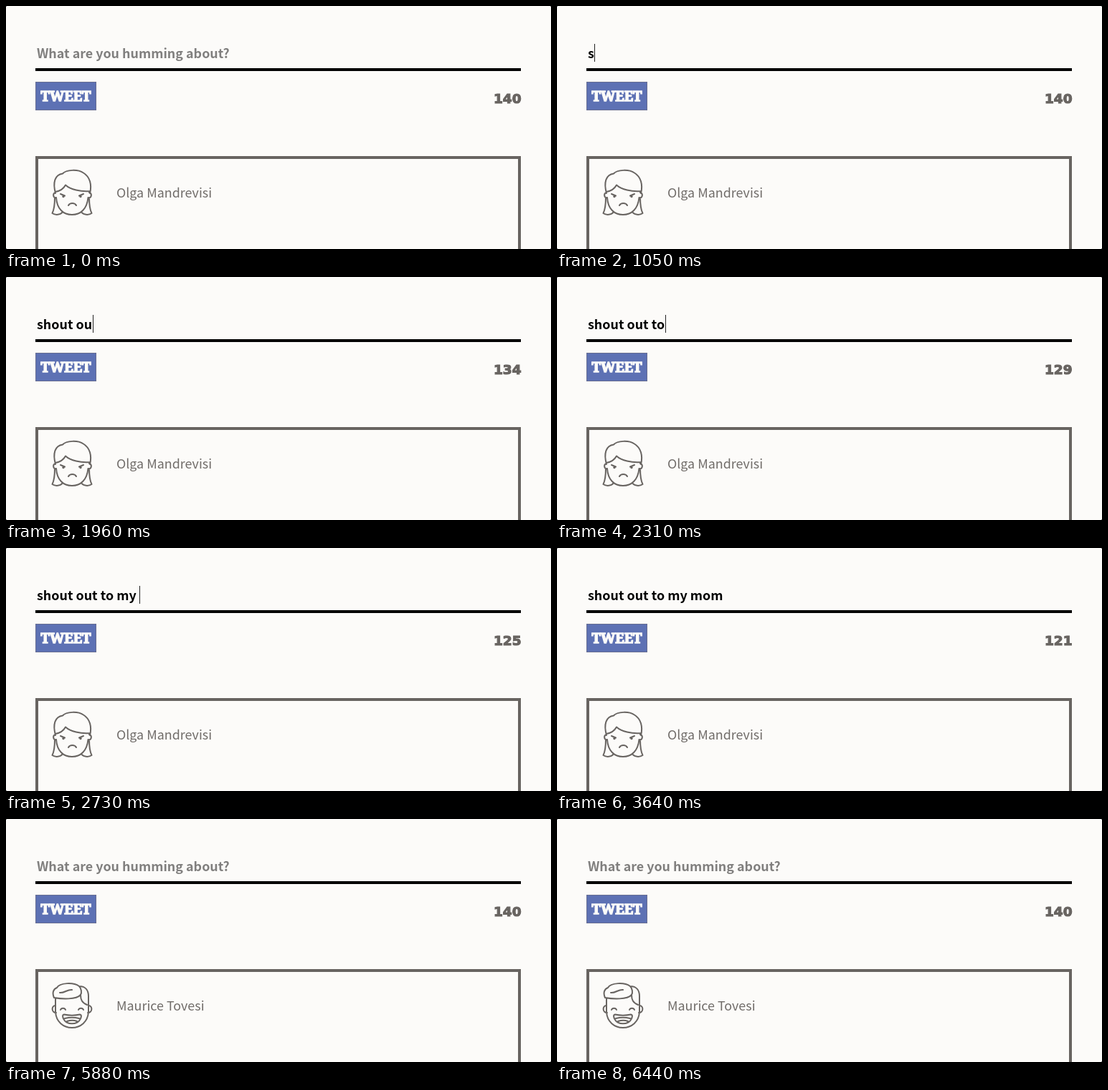
These frames come from a looping animation (760x340 px, 8000 ms). An HTML page with a canvas:

```html
<!DOCTYPE html>
<html lang="en">
<head>
<meta charset="utf-8">
<title>Compose box</title>
<style>
  html, body { margin: 0; width: 100%; height: 100%; overflow: hidden; background: #fcfbf9; }
  canvas { display: block; }
</style>
</head>
<body>
<canvas id="stage" width="760" height="340"></canvas>
<script>
const ctx = document.getElementById('stage').getContext('2d');

const LOOP = 8000;
const PAPER = '#fcfbf9', GREY = '#686461', BLUE = '#5d71b4';
const SANS = '"Noto Sans CJK JP", "Noto Sans CJK SC", "Noto Sans CJK", "Noto Sans", sans-serif';
const BODY = 'bold 17.9px ' + SANS;
const NAME = '300 17.9px ' + SANS;

const MESSAGE = 'shout out to my mom';
const KEY_TIMES = [
  1050, 1190, 1330, 1400, 1540, 1750,
  1890, 1960, 2030, 2100, 2170, 2240, 2380,
  2520, 2590, 2730, 2870, 2940, 3080
];
const FOCUS = 840, BLUR = 3640, SENT = 4830, REPLY = 5740;
const COUNT_LAG = 140;

const sadGirl = {
  lines: [
    // hair outline and curled ends
    'M69 262 C65 247 68 236 79 234.5 C84 229 100 228 108 233.5 C117 239 120 250 117 262',
    'M68 268 C68 277 67 285 64.5 290 C69 293 76 292.5 79 288',
    'M116 268 C116 277 117 285 119.5 290 C115 293 108 292.5 105 288',
    // fringe
    'M69 260 C75 259 80 256 83 250.5 C90 257 104 260 117 259',
    // face and ears
    'M70 268 C71 284 80 292 92 292 C104 292 113 284 114.5 268',
    'M69 261 C65 262 65 268 70 269 M116 261 C120 262 120 268 115 269',
    // mouth and brows
    'M87 279 C89 275 96 275 98 279',
    'M76 263 L82 265.5 M108 263 L102 265.5'
  ],
  dots: [[80, 266.5], [104, 266.5]]
};

const happyBoy = {
  lines: [
    // quiff
    'M67 250 C64 243 66 238 71 236 C75 229 94 228 102 234 C111 234 115 240 115 248 L115 262',
    'M67 250 C78 252 98 253 104 246 C106 243 105 237 102 234',
    'M75 243 C81 244 86 238 92 239',
    'M104 246 C104 253 106 257 113 260',
    // sides, ears and jaw
    'M69 251 L69 270 C70 284 80 292 92 292 C104 292 114 284 115 270 L115 262',
    'M69 261 C63 261 63 271 70 271 M115 261 C121 261 121 271 114 271',
    // closed eyes
    'M76 267 C77 264 82 264 83 267 M101 267 C102 264 107 264 108 267',
    // grin
    'M81 273.5 C88 275 96 275 103 273.5 C106 274 105 278 103 281 C99 288 85 288 81 281 C79 278 78 274 81 273.5 Z',
    'M82 279 C88 277.5 96 277.5 102 279 M85 283 C90 281.5 95 281.5 99 283'
  ],
  dots: []
};

for (const face of [sadGirl, happyBoy]) face.path = new Path2D(face.lines.join(' '));

function rect(x, y, w, h, color) {
  ctx.fillStyle = color;
  ctx.fillRect(x, y, w, h);
}

function label(text, x, y, font, color, { align = 'left', stroke = 0 } = {}) {
  ctx.font = font;
  ctx.textAlign = align;
  ctx.fillStyle = ctx.strokeStyle = color;
  ctx.fillText(text, x, y);
  if (stroke) {
    ctx.lineWidth = stroke;
    ctx.lineJoin = 'miter';
    ctx.miterLimit = 2;
    ctx.strokeText(text, x, y);
  }
}

function drawFace({ path, dots }) {
  ctx.strokeStyle = ctx.fillStyle = GREY;
  ctx.lineWidth = 2;
  ctx.lineCap = ctx.lineJoin = 'round';
  ctx.stroke(path);
  for (const [x, y] of dots) {
    ctx.beginPath();
    ctx.arc(x, y, 1.7, 0, Math.PI * 2);
    ctx.fill();
  }
}

// Number of characters in the field at time t
function typed(t) {
  return t >= SENT ? 0 : KEY_TIMES.filter(k => k <= t).length;
}

function drawField(t) {
  const text = MESSAGE.slice(0, typed(t));
  if (text) label(text, 43, 73, BODY, '#000');
  else label('What are you humming about?', 43, 73, BODY, '#807f7e');
  if (t >= FOCUS && t < BLUR) {
    ctx.font = BODY;
    rect(Math.floor(44 + ctx.measureText(text).width) - (text ? 0 : 1), 53, 1, 25, '#222');
  }
  rect(41, 87, 677, 4, '#000');
}

function drawControls(t) {
  rect(41, 106, 85, 40, '#676e92');
  rect(42, 107, 83, 38, BLUE);
  label('TWEET', 83.5, 132.6, '900 19px "Noto Serif", serif', PAPER, { align: 'center', stroke: 1.5 });
  label(String(140 - typed(t - COUNT_LAG)), 718.5, 136.3,
    'bold 18.5px "DejaVu Sans", sans-serif', GREY, { align: 'right', stroke: 1.2 });
}

function drawCard(t) {
  ctx.strokeStyle = GREY;
  ctx.lineWidth = 4;
  ctx.lineJoin = 'miter';
  ctx.strokeRect(43, 212, 673, 200);
  const replied = t >= REPLY;
  drawFace(replied ? happyBoy : sadGirl);
  label(replied ? 'Maurice Tovesi' : 'Olga Mandrevisi', 154, 268, NAME, '#706c69');
}

function drawCorners() {
  for (const x of [0, 759]) for (const y of [0, 339]) rect(x, y, 1, 1, '#777');
}

function draw(t) {
  rect(0, 0, 760, 340, PAPER);
  drawField(t);
  drawControls(t);
  drawCard(t);
  drawCorners();
}

let start;
function tick(now) {
  start ??= now;
  draw((now - start) % LOOP);
  requestAnimationFrame(tick);
}
draw(0);
requestAnimationFrame(tick);
</script>
</body>
</html>
```
